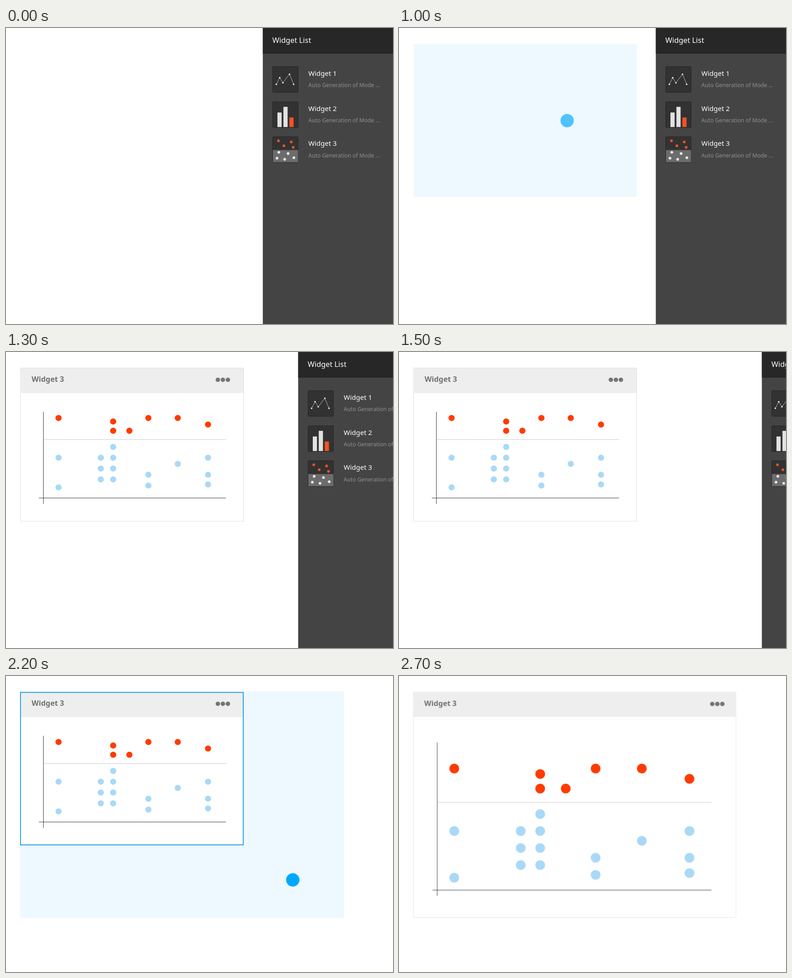
An HTML page that plays this animation: 854x656 px, repeating every 4400 ms.

```html
<!DOCTYPE html>
<html lang="en">
<head>
<meta charset="utf-8">
<title>Widget list</title>
<style>
  html, body { margin: 0; width: 100%; height: 100%; overflow: hidden; background: #fff; }
  svg { display: block; }
  text { font-family: "Noto Sans", "Open Sans", sans-serif; }

  .head { font-size: 16.4px; fill: #fff; }
  .name { font-size: 15px; fill: #fff; }
  .note { font-size: 12.2px; fill: #909090; }
  .title { font-size: 16.3px; font-weight: 600; fill: #707070; }
  .tile { fill: #323232; stroke: #232323; }
  .frame { fill: #fff; stroke: #dedede; }
  .bar { fill: #eee; }
  .menu { fill: #757575; }
  .axis { stroke: #333; fill: none; }
  .split { stroke: #c8c8c8; }
  .hot { fill: #ff3b00; }
  .cool { fill: #a9d9f7; }
  .accent { fill: #f15322; }
  .pale { fill: #e2e2e2; }
  .blue { fill: #00a8ff; }

  .anim { animation: 4400ms step-end infinite; }
  #panel { animation-name: slide; }
  #dot { animation-name: drag; }
  #zoneA { animation-name: hintA; }
  #zoneB { animation-name: hintB; }
  #small { animation-name: small; }
  #ring { animation-name: ring; }
  #large { animation-name: grow; transform-origin: 31px 35px; }

  @keyframes slide {
    0% { transform: none; }
    29.54% { transform: translateX(78px); }
    31.81% { transform: translateX(156px); }
    34.09% { transform: translateX(234px); }
    36.36%, 100% { transform: translateX(312px); }
  }
  @keyframes drag {
    0% { opacity: 0; transform: translate(724px, 267.5px); }
    15.9% { opacity: 1; transform: translate(724px, 267.5px); }
    18.18% { opacity: 1; transform: translate(606.3px, 246.8px); }
    20.45% { opacity: 1; transform: translate(488.7px, 226.1px); }
    22.72% { opacity: .667; transform: translate(371px, 205.3px); }
    24.99% { opacity: .333; transform: translate(371px, 205.3px); }
    27.27% { opacity: 0; transform: translate(371px, 205.3px); }
    40.9% { opacity: 1; transform: translate(524px, 375px); }
    43.18% { opacity: 1; transform: translate(551.2px, 394.2px); }
    45.45% { opacity: 1; transform: translate(578.4px, 413.4px); }
    47.72% { opacity: 1; transform: translate(605.6px, 432.6px); }
    49.99% { opacity: 1; transform: translate(632.8px, 451.8px); }
    52.27%, 100% { opacity: 0; transform: translate(632.8px, 451.8px); }
  }
  @keyframes hintA {
    0% { opacity: 0; }
    22.72% { opacity: .067; }
    24.99% { opacity: .133; }
    27.27% { opacity: .2; }
    29.54%, 100% { opacity: 0; }
  }
  @keyframes hintB {
    0% { opacity: 0; }
    47.72% { opacity: .033; }
    49.99% { opacity: .067; }
    52.27%, 100% { opacity: 0; }
  }
  @keyframes small {
    0% { opacity: 0; }
    29.54% { opacity: 1; }
    52.27%, 100% { opacity: 0; }
  }
  @keyframes ring {
    0% { opacity: 0; }
    40.9% { opacity: 1; }
    52.27%, 100% { opacity: 0; }
  }
  @keyframes grow {
    0% { opacity: 0; transform: none; }
    52.27% { opacity: 1; transform: scale(.8); }
    54.54% { opacity: 1; transform: scale(.94); }
    56.81% { opacity: 1; transform: scale(1.02); }
    59.09% { opacity: 1; transform: scale(1.01); }
    61.36%, 100% { opacity: 1; transform: none; }
  }
</style>
</head>
<body>
<svg width="854" height="656" viewBox="0 0 854 656">
  <defs>
    <g id="points">
      <g class="hot">
        <circle cx="116" cy="146.3" r="6.8"/>
        <circle cx="236.5" cy="154" r="6.8"/>
        <circle cx="236.5" cy="174.5" r="6.8"/>
        <circle cx="272.3" cy="174.5" r="6.8"/>
        <circle cx="314.2" cy="146.3" r="6.8"/>
        <circle cx="379" cy="146.3" r="6.8"/>
        <circle cx="445.8" cy="160.8" r="6.8"/>
      </g>
      <g class="cool">
        <circle cx="116" cy="234.3" r="6.8"/>
        <circle cx="116" cy="300" r="6.8"/>
        <circle cx="209.2" cy="234.3" r="6.8"/>
        <circle cx="209.2" cy="258.2" r="6.8"/>
        <circle cx="209.2" cy="282.2" r="6.8"/>
        <circle cx="236.5" cy="210.4" r="6.8"/>
        <circle cx="236.5" cy="234.3" r="6.8"/>
        <circle cx="236.5" cy="258.2" r="6.8"/>
        <circle cx="236.5" cy="282.2" r="6.8"/>
        <circle cx="314.2" cy="272" r="6.8"/>
        <circle cx="314.2" cy="296" r="6.8"/>
        <circle cx="379" cy="248" r="6.8"/>
        <circle cx="445.8" cy="234.3" r="6.8"/>
        <circle cx="445.8" cy="272" r="6.8"/>
        <circle cx="445.8" cy="293.5" r="6.8"/>
      </g>
    </g>
    <g id="more" class="menu">
      <circle r="4.9"/><circle cx="11.1" r="4.9"/><circle cx="22.2" r="4.9"/>
    </g>
    <rect id="tile" class="tile" x="588.5" y="85.5" width="56" height="57" rx="1.5"/>
  </defs>

  <rect id="zoneA" class="anim blue" x="32.4" y="35.4" width="492.6" height="338.6"/>
  <rect id="zoneB" class="anim blue" x="31" y="34.3" width="715" height="501.7"/>

  <g id="small" class="anim">
    <rect class="frame" x="32" y="35.5" width="492.5" height="339.6"/>
    <rect class="bar" x="32.5" y="36" width="491.5" height="55"/>
    <text class="title" x="56.6" y="66.3">Widget 3</text>
    <use href="#more" x="467.5" y="61.6"/>
    <path class="split" d="M83 194H486"/>
    <path class="axis" d="M82.5 132.5V336.5M72.5 323.6H485.5"/>
    <use href="#points"/>
  </g>
  <rect id="ring" class="anim" x="32" y="36.4" width="491.5" height="337.8" fill="none" stroke="#129ae6" stroke-width="1.8"/>

  <g id="large" class="anim">
    <rect class="frame" x="31.5" y="35.5" width="712" height="499.8" style="stroke:#e6e6e6"/>
    <rect class="bar" x="31.5" y="35.5" width="712" height="55"/>
    <text class="title" x="55.6" y="66.8">Widget 3</text>
    <use href="#more" x="691.3" y="62"/>
    <path class="split" d="M84 280H689.5"/>
    <path class="axis" d="M84.2 147.5V487M74 474.5H689.5"/>
    <use href="#points" transform="translate(-60.7 -25.2) scale(1.574)"/>
  </g>

  <g id="panel" class="anim">
    <rect x="566.7" width="288" height="656" fill="#444"/>
    <rect x="566.7" width="288" height="57" fill="#272727"/>
    <text class="head" x="587.7" y="33.2">Widget List</text>

    <use href="#tile"/>
    <path d="M596.5 124.7L604 110.2L611 121.4L625.6 102.4L634.8 124.7" fill="none" stroke="#bdbdbd"/>
    <g fill="#eee">
      <circle cx="596.5" cy="124.7" r="1.7"/><circle cx="604" cy="110.2" r="1.7"/>
      <circle cx="611" cy="121.4" r="1.7"/><circle cx="625.6" cy="102.4" r="1.7"/>
      <circle cx="634.8" cy="124.7" r="1.7"/>
    </g>
    <text class="name" x="667.3" y="105.8">Widget 1</text>
    <text class="note" x="667.2" y="131">Auto Generation of Mode ...</text>

    <use href="#tile" y="78"/>
    <path class="pale" d="M599 187.3h9.2V219.5H599zM612.2 174.8h9.2V219.5h-9.2z"/>
    <path class="accent" d="M625.4 198.3h9.2V219.5h-9.2z"/>
    <text class="name" x="667.3" y="183.6">Widget 2</text>
    <text class="note" x="667.2" y="208.8">Auto Generation of Mode ...</text>

    <use href="#tile" y="155.5"/>
    <rect x="589" y="270.5" width="55.5" height="27" fill="#6c6c6c"/>
    <g class="accent">
      <circle cx="601.2" cy="250" r="3"/><circle cx="613.2" cy="261" r="3"/>
      <circle cx="629.4" cy="252.6" r="3"/><circle cx="633.7" cy="264.6" r="3"/>
    </g>
    <g fill="#e8e8e8">
      <circle cx="602" cy="275.6" r="3"/><circle cx="622.5" cy="278.2" r="3"/>
      <circle cx="598" cy="288.5" r="3"/><circle cx="614.9" cy="291" r="3"/>
      <circle cx="635.2" cy="287.5" r="3"/>
    </g>
    <text class="name" x="667.3" y="261.4">Widget 3</text>
    <text class="note" x="667.2" y="286.6">Auto Generation of Mode ...</text>
  </g>

  <circle id="dot" class="anim blue" r="14.7"/>
</svg>
</body>
</html>
```
